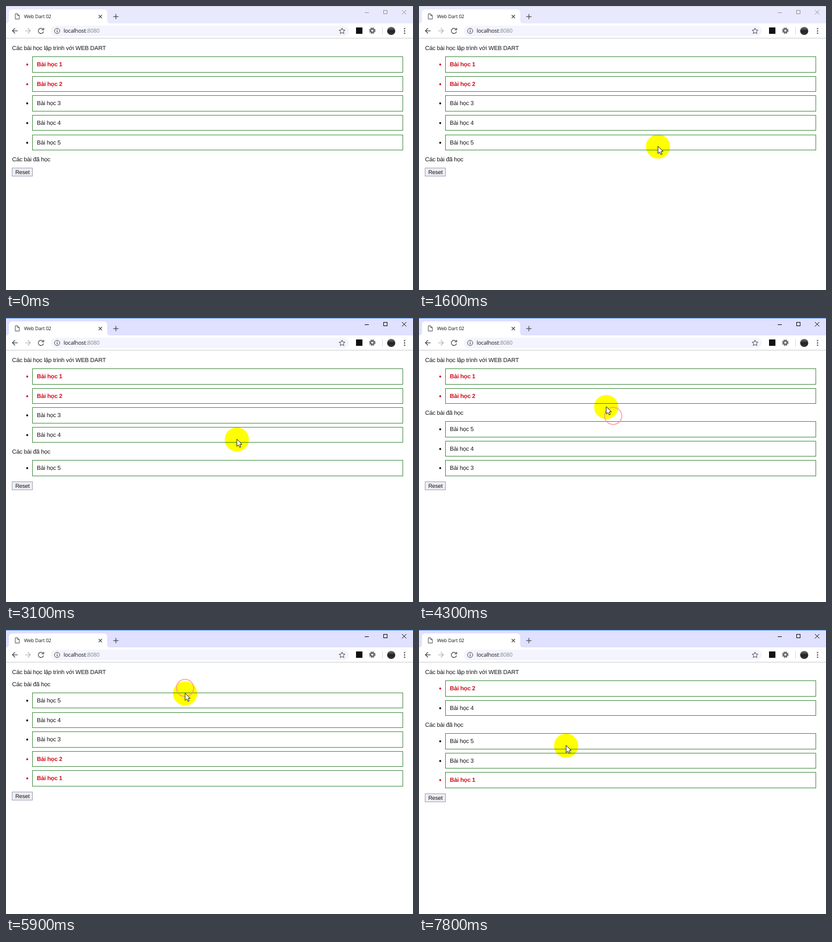
An HTML page for the animation above (8 s loop, 700 px wide and 490 px high).

```html
<!DOCTYPE html>
<html lang="vi">
<head>
<meta charset="utf-8">
<title>Web Dart 02</title>
<style>
  html, body { margin: 0; width: 100%; height: 100%; overflow: hidden; background: #fff; }
  svg { display: block; }
  text { font: 10.2px "Liberation Sans", Arial, sans-serif; letter-spacing: -.16px; fill: #161616; white-space: pre; text-rendering: geometricPrecision; }
  .ui { font-family: "Open Sans", "Noto Sans", sans-serif; }
  .line { fill: none; stroke: #505357; stroke-width: 1.3; }
  #bar { fill: #e9e9fd; }
  #edge { fill: #cfcfdc; }
  #buttons { fill: none; stroke: #999; }
  .active #bar { fill: #e0e0ff; }
  .active #edge { fill: #5f9cf5; }
  .active #buttons { stroke: #111; }
  .item rect { fill: none; stroke: #488f48; }
  .key text { fill: #d0101c; font-weight: bold; }
  .key circle { fill: #d0101c; }
  #halo { fill: #ff0; mix-blend-mode: multiply; }
  #ring { fill: none; stroke: #ff8a94; stroke-width: 1.8; }
</style>
</head>
<body>
<svg id="stage" width="700" height="490" viewBox="0 0 700 490">
  <defs>
    <linearGradient id="photo" x2="0" y2="1">
      <stop offset="0" stop-color="#777a80"/><stop offset=".5" stop-color="#222"/><stop offset="1" stop-color="#38383a"/>
    </linearGradient>
  </defs>

  <!-- Browser window -->
  <rect id="bar" width="700" height="30"/>
  <rect id="edge" width="700" height="1"/>
  <path d="M0 30Q5 30 5 25V12Q5 6 11 6H168Q174 6 174 12V25Q174 30 179 30Z" fill="#fff"/>
  <path class="line" d="M16 13.5h4l3 3v6h-7zM20 13.5v3h3" style="stroke-width:1"/>
  <text class="ui" x="31" y="21" style="font-size:8.4px">Web Dart 02</text>
  <path class="line" d="M159.500 15.500l5.500 5.500m0-5.500l-5.500 5.500M184.500 18.300h9m-4.500-4.500v9"/>
  <g id="buttons">
    <path d="M617 11.500h7M681 7l7.500 7.500m0-7.500l-7.500 7.500"/>
    <rect x="649.500" y="7.500" width="6" height="6"/>
  </g>

  <rect x="77" y="34" width="513" height="18" rx="9" fill="#f3f4fd"/>
  <path class="line" d="M20 42.800h-9m4.500-4.500l-4.500 4.500 4.500 4.500"/>
  <path class="line" d="M33 42.800h9m-4.500-4.500l4.500 4.500-4.500 4.500" style="stroke:#b9bbbe"/>
  <path class="line" d="M63.500 40A4.500 4.500 0 1 0 64.500 44M64.800 37.800v3.400h-3.500"/>
  <circle class="line" cx="88" cy="43" r="4.500" style="stroke-width:1"/>
  <path class="line" d="M88 42.300v3.200M88 40.200v1.100"/>
  <text class="ui" x="99" y="46.300" style="font-size:9.5px">localhost<tspan fill="#85888c">:8080</tspan></text>
  <path class="line" d="M578 38l1.400 3.400 3.700.3-2.800 2.400.9 3.600-3.200-1.900-3.200 1.900.9-3.600-2.800-2.400 3.700-.3z" style="stroke-width:1"/>
  <rect x="602" y="37" width="11" height="11" fill="#111"/>
  <circle cx="630" cy="42.500" r="4.700" fill="none" stroke="#66696d" stroke-width="1.800" stroke-dasharray="2.200 1.490"/>
  <circle cx="630" cy="42.500" r="3" fill="none" stroke="#66696d" stroke-width="2.400"/>
  <path d="M647.500 36v13" stroke="#d9dade"/>
  <circle cx="662.500" cy="43" r="7" fill="url(#photo)"/>
  <g fill="#505357"><circle cx="685.500" cy="39" r="1.200"/><circle cx="685.500" cy="43" r="1.200"/><circle cx="685.500" cy="47" r="1.200"/></g>
  <rect y="55" width="700" height="1" fill="#cdced2"/>

  <!-- Page -->
  <text x="10.500" y="75.700">Các bài học lập trình với WEB DART</text>
  <text id="done" x="10.500">Các bài đã học</text>
  <g id="items"></g>
  <g id="reset">
    <rect x="10.500" y="-7" width="35" height="14" fill="#ededf4" stroke="#a3a6b8"/>
    <text x="16" y="3.400" style="font-size:9.7px">Reset</text>
  </g>

  <circle id="halo" r="20.800"/>
  <circle id="ring"/>
  <path id="arrow" d="M0 0V12.600L2.900 9.900 4.900 14.200 7 13.300 5.100 9H9Z" fill="#fff" stroke="#111" stroke-width=".9"/>
</svg>
<script>
const $ = id => document.getElementById(id);
const LOOP = 8000, STEP = 100, LAST = 7800, RING_LIFE = 300;
const PITCH = 33.6, BOX = 26.4;

// Pointer path: time, x, y
const path = [
  [200, 560, -25], [700, 425, 138], [1600, 411, 243], [2000, 408, 238], [2500, 405, 236],
  [3100, 397, 210], [3400, 395, 200], [3600, 392, 196], [4100, 334, 169], [4300, 322, 154],
  [4500, 318, 134], [4800, 316, 134], [5400, 309, 99], [5700, 308, 100], [5900, 308, 110],
  [6300, 300, 97], [6900, 272, 157], [7000, 271, 157], [7300, 257, 224], [7400, 256, 224], [7800, 253, 200]
];
// Clicks: time, lesson toggled
const clicks = [[2000, 5], [3400, 4], [4100, 3], [4800, 2], [5700, 1], [7000, 4], [7400, 2]];

const lessons = [1, 2, 3, 4, 5];
$('items').innerHTML = lessons.map(n => `
  <g class="item ${n < 3 ? 'key' : ''}">
    <circle cx="36.500" cy="14" r="1.700"/>
    <rect x="45.500" y=".5" width="637"/>
    <text x="53" y="17.400">Bài học ${n}</text>
  </g>`).join('');
const rows = [...$('items').children];

const move = (el, x, y) => el.setAttribute('transform', `translate(${x} ${y})`);

function pointerAt(t) {
  const i = path.findIndex(p => p[0] >= t);
  if (i < 1) return path[0].slice(1);
  const [t0, x0, y0] = path[i - 1], [t1, x1, y1] = path[i];
  const k = (t - t0) / (t1 - t0);
  return [x0 + (x1 - x0) * k, y0 + (y1 - y0) * k];
}

// Top and bottom edges snap to whole pixels separately
function placeList(list, start) {
  list.forEach((n, i) => {
    const row = rows[n - 1], top = start + PITCH * i, y = Math.round(top);
    move(row, 0, y);
    row.querySelector('rect').setAttribute('height', Math.round(top + BOX) - y);
  });
}

function draw(t) {
  const past = clicks.filter(c => c[0] <= t);
  let learned = [];
  for (const [, n] of past)
    learned = learned.includes(n) ? learned.filter(m => m !== n) : [...learned, n];
  const open = lessons.filter(n => !learned.includes(n));

  const head = open.length ? 96 + PITCH * open.length : 93;
  placeList(open, 87.15);
  placeList(learned, head + 15.05);
  $('done').setAttribute('y', head + 3.7);
  move($('reset'), 0, Math.floor(head + PITCH * learned.length + (learned.length ? 25.5 : 22.5)) + .5);
  $('stage').classList.toggle('active', past.length > 0);

  const [x, y] = pointerAt(t);
  move($('halo'), x, y - .5);
  move($('arrow'), x, y - 1);

  const click = past.at(-1), age = click ? t - click[0] : Infinity;
  const shown = age <= RING_LIFE;
  $('ring').style.display = shown ? '' : 'none';
  if (shown) {
    move($('ring'), ...pointerAt(click[0]));
    $('ring').setAttribute('r', 4 + age * .054);
    $('ring').style.opacity = 1 - age / 800;
  }
}

function tick() {
  const t = performance.now() % LOOP;
  draw(Math.min(LAST, Math.floor(t / STEP) * STEP));
  requestAnimationFrame(tick);
}
tick();
</script>
</body>
</html>
```
